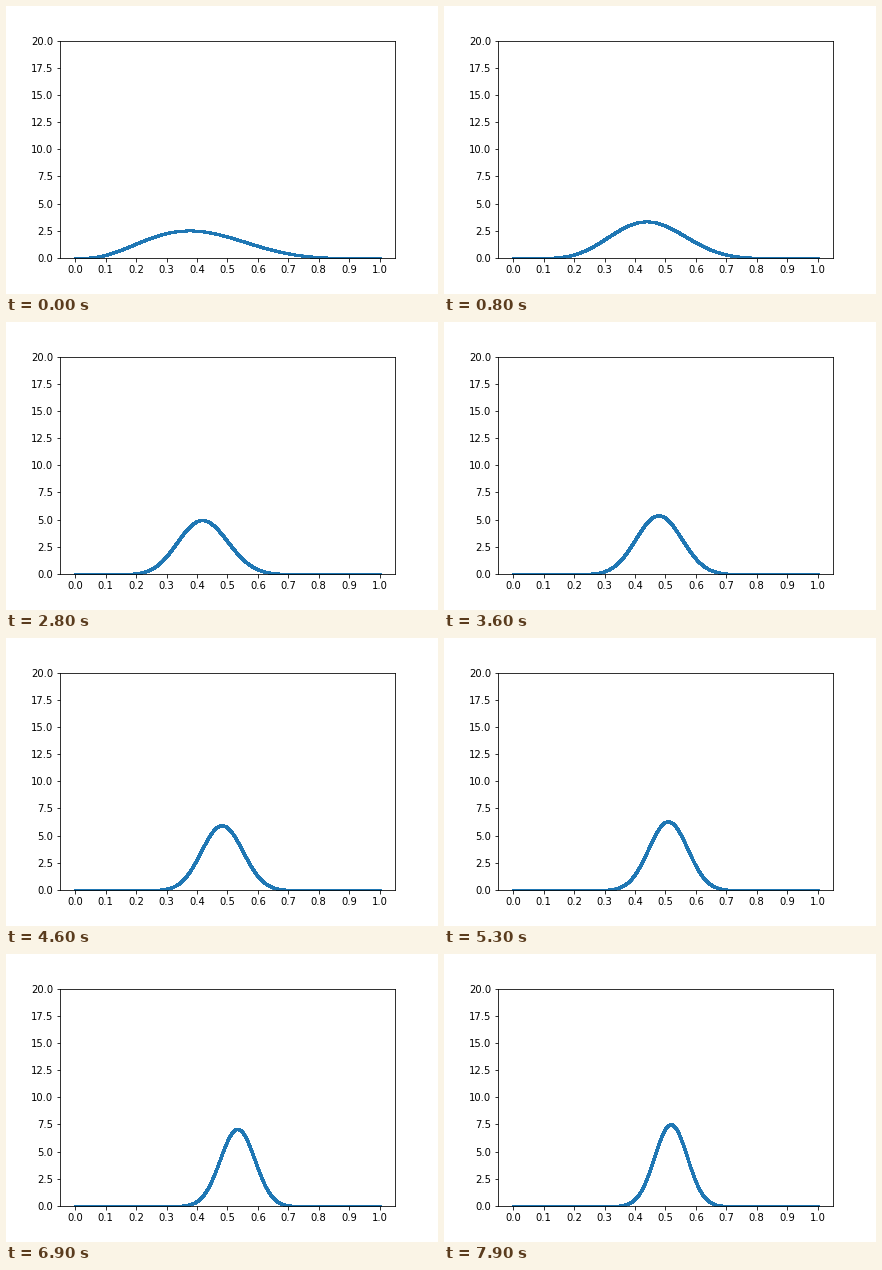
A matplotlib script that plays this animation: 432x288 px, repeating every 8 s.

```python
import math

import matplotlib.pyplot as plt
import numpy as np
from matplotlib.animation import FuncAnimation

# Posterior of a coin's bias, updated with one toss per frame.
TOSSES = (
    "HTTHTHTHTH" "TTHTHTHHHT" "TTHTTTTHHH" "HHHTTHTTHT"
    "HTHTHHHTHH" "THHHHHHHTT" "TTTHHHHHTT" "HTTTHTHTH"
)
START_HEADS, START_TOSSES = 3, 8

x = np.linspace(0, 1, 10000)


def posterior(step):
    n = START_TOSSES + step
    k = START_HEADS + TOSSES[:step].count("H")
    return (n + 1) * math.comb(n, k) * x**k * (1 - x) ** (n - k)


fig, ax = plt.subplots(figsize=(6, 4), dpi=72, facecolor="white")
fig.subplots_adjust(left=0.125, right=0.9, bottom=0.125, top=0.88)
ax.set(xlim=(-0.05, 1.05), ylim=(0, 20))
ax.set_xticks(np.arange(11) / 10)
ax.set_yticks(np.arange(0, 20.1, 2.5))
(dots,) = ax.plot(x, posterior(0), ".", color="#1f77b4", markersize=4)


def update(step):
    dots.set_ydata(posterior(step))
    return (dots,)


anim = FuncAnimation(fig, update, frames=len(TOSSES) + 1, interval=100,
                     repeat=True, repeat_delay=0, blit=False)
plt.show()
```
